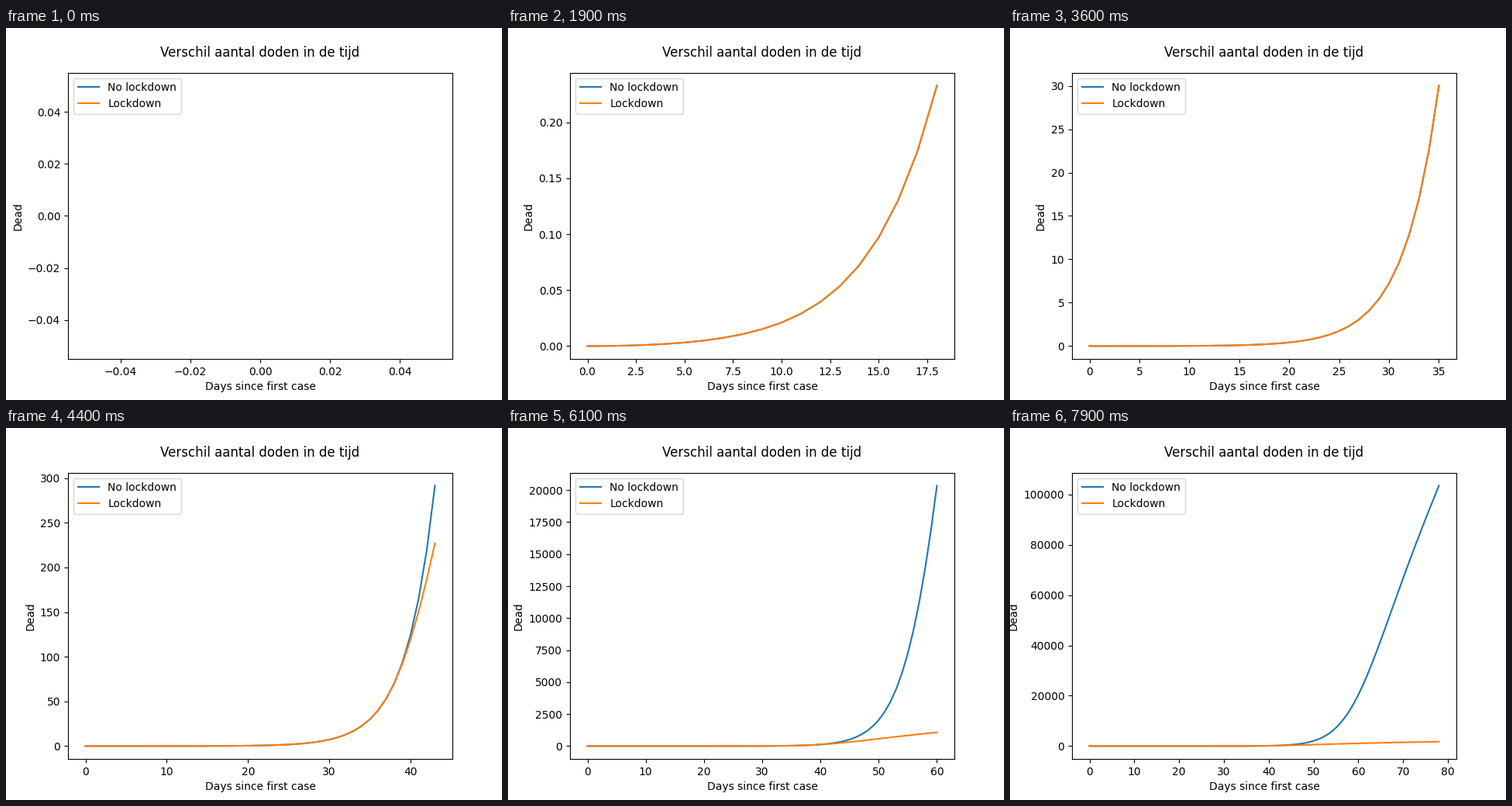
Animation, 640 px wide and 480 px high, one loop 8000 ms. Source, as a matplotlib script:

```python
import numpy as np
import matplotlib.pyplot as plt
from matplotlib.animation import FuncAnimation

FRAMES, STEP = 80, 100
SUB = 20                          # integration steps per day
GROWTH, SEED = 0.28503, 0.001396  # daily growth, scale of the first deaths
LAG, LAG_DECAY = 0.0034, 0.2      # early shortfall while first cases incubate
LOCK_DAY, LOCK_TIME = 37, 8.5

t = np.arange((FRAMES - 2) * SUB + 1) / SUB


def deaths(brake):
    """Exponential growth whose rate is slowed by the given brake."""
    rate = GROWTH / (1 + brake)
    steps = (rate[1:] + rate[:-1]) / (2 * SUB)
    total = np.concatenate([[0], np.cumsum(steps)])
    shortfall = LAG - (LAG - SEED) * np.exp(-LAG_DECAY * t)
    return (SEED * np.exp(total) - shortfall)[::SUB]


x = t - 60
saturation = np.exp(-0.48 + 0.192 * x - 0.0038 * x**2)
lockdown = (np.maximum(t - LOCK_DAY, 0) / LOCK_TIME) ** 1.75

days = t[::SUB]
series = {"No lockdown": deaths(saturation), "Lockdown": deaths(lockdown)}

fig, ax = plt.subplots(figsize=(6.4, 4.8), dpi=100)


def draw(frame):
    n = max(frame, 1)
    ax.clear()
    for name, dead in series.items():
        ax.plot(days[:n], dead[:n], label=name)
    ax.set_title("Verschil aantal doden in de tijd", pad=15)
    ax.set_xlabel("Days since first case")
    ax.set_ylabel("Dead")
    ax.legend(loc="upper left")


anim = FuncAnimation(fig, draw, frames=FRAMES, interval=STEP,
                     init_func=lambda: draw(0), repeat=True)
plt.show()
```
